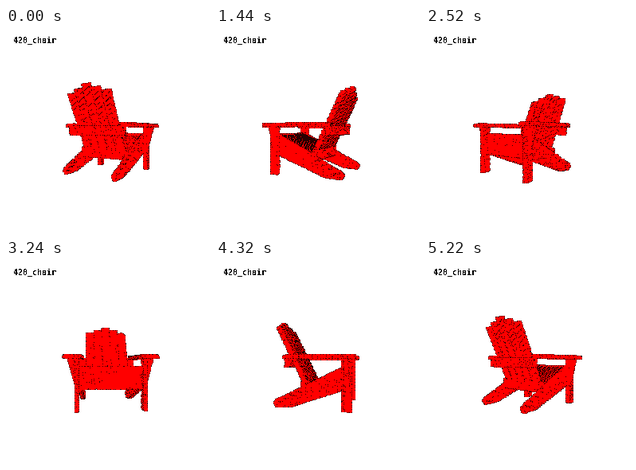
A matplotlib script that plays this animation: 256x256 px, repeating every 5.4 s.

```python
import numpy as np
import matplotlib.pyplot as plt
from matplotlib.animation import FuncAnimation

SIZE, DPI = 256, 100
FRAMES, INTERVAL = 30, 180
START, STEP = 149, 12        # yaw in degrees
CAMERA = 250                 # distance from the turning axis
DENSITY = 0.52               # points per unit of surface
RED, RIM = (255, 0, 0), (40, 0, 0)

rng = np.random.default_rng(420)

# Column orders that turn (a, b, depth) into (across, forward, up)
SIDE, TOP, FRONT = [2, 0, 1], [0, 1, 2], [0, 2, 1]


def triangle(a, b, c):
    """Evenly spread points: one half of a low-discrepancy parallelogram."""
    area = np.linalg.norm(np.cross(b - a, c - a))
    k = np.arange(int(round(area * DENSITY)))[:, None]
    st = (rng.random(2) + k * (0.7548776662, 0.5698402910)) % 1
    st = st[st.sum(axis=1) <= 1]
    return a + st[:, :1] * (b - a) + st[:, 1:] * (c - a)


def prism(poly, lo, hi, order):
    """Points on the surface of an extruded convex polygon."""
    flat = np.array(poly, float)
    near, far = (np.column_stack([flat, np.full(len(flat), t)]) for t in (lo, hi))
    parts = []
    for cap in (near, far):
        parts += [triangle(cap[0], cap[i], cap[i + 1]) for i in range(1, len(cap) - 1)]
    for i in range(len(flat)):
        j = (i + 1) % len(flat)
        parts += [triangle(near[i], near[j], far[j]), triangle(near[i], far[j], far[i])]
    return np.vstack(parts)[:, order]


def box(across, forward, up):
    (v0, v1), (h0, h1) = forward, up
    return prism([(v0, h0), (v1, h0), (v1, h1), (v0, h1)], *across, SIDE)


def slat(u, top):
    v = -5 - (top + 27) * 0.506
    poly = [(-5, -27), (v, top), (v - 3, top - 1), (-8, -28)]
    return prism(poly, u - 4.4, u + 4.4, SIDE)


def build_chair():
    plank = [(34, -6), (34, -29), (-23, -49), (-41, -50), (-44, -46), (-41, -43)]
    arm = [(32, 47), (46, 48), (49.5, 44), (42.5, -28.5), (32, -28.5)]
    pair = [
        box((34.8, 37.2), (34, 43.5), (-50.5, 5)),
        prism(plank, 31, 33.5, SIDE),
        prism(arm, 5, 7.3, TOP),
        prism([(37, 4), (45, 4), (37, -24)], 37, 40, FRONT),
    ]
    parts = pair + [p * (-1, 1, 1) for p in pair]
    parts += [slat(11.3 * k, 49.5 - 4 * abs(k)) for k in range(-2, 3)]
    parts += [
        prism([(37, -6), (37, -9), (-10, -31), (-10, -27)], -33, 33, SIDE),
        box((-33, 33), (36, 38), (-28, -5)),
        box((-31, 31), (-12, -9), (-32.5, -22)),
        box((-36.5, 36.5), (-29, -26), (-4.5, 4.5)),
    ]
    return np.vstack(parts)


chair = build_chair()


def render(yaw):
    """Depth-sorted 3x3 balls: red cross, dark corners."""
    u, v, h = chair.T
    c, s = np.cos(yaw), np.sin(yaw)
    z = v * c - u * s
    scale = CAMERA / (CAMERA - z)
    x = np.rint(SIZE / 2 - 0.5 + (u * c + v * s) * scale).astype(int)
    y = np.rint(SIZE / 2 - h * scale).astype(int)

    xs, ys, depth, rim = [], [], [], []
    for dx in (-1, 0, 1):
        for dy in (-1, 0, 1):
            r2 = dx * dx + dy * dy
            xs.append(x + dx)
            ys.append(y + dy)
            depth.append(z - 1.25 * r2)
            rim.append(np.full(len(z), r2 == 2))
    xs, ys, depth, rim = map(np.concatenate, (xs, ys, depth, rim))
    order = np.argsort(depth, kind="stable")
    img = np.full((SIZE, SIZE, 3), 255, np.uint8)
    img[ys[order], xs[order]] = np.where(rim[order, None], RIM, RED)
    return img


fig = plt.figure(figsize=(SIZE / DPI, SIZE / DPI), dpi=DPI, facecolor="white")
ax = fig.add_axes([0, 0, 1, 1])
ax.axis("off")
view = ax.imshow(render(np.radians(START)), interpolation="nearest", aspect="auto")
ax.text(9.5, 18.5, "420_chair", family="DejaVu Sans Mono", weight="bold",
        fontsize=10 * 72 / DPI, color="black", va="baseline", antialiased=False)


def update(i):
    view.set_data(render(np.radians(START + STEP * i)))
    return [view]


anim = FuncAnimation(fig, update, frames=FRAMES, interval=INTERVAL,
                     repeat=True, repeat_delay=0)
plt.show()
```
